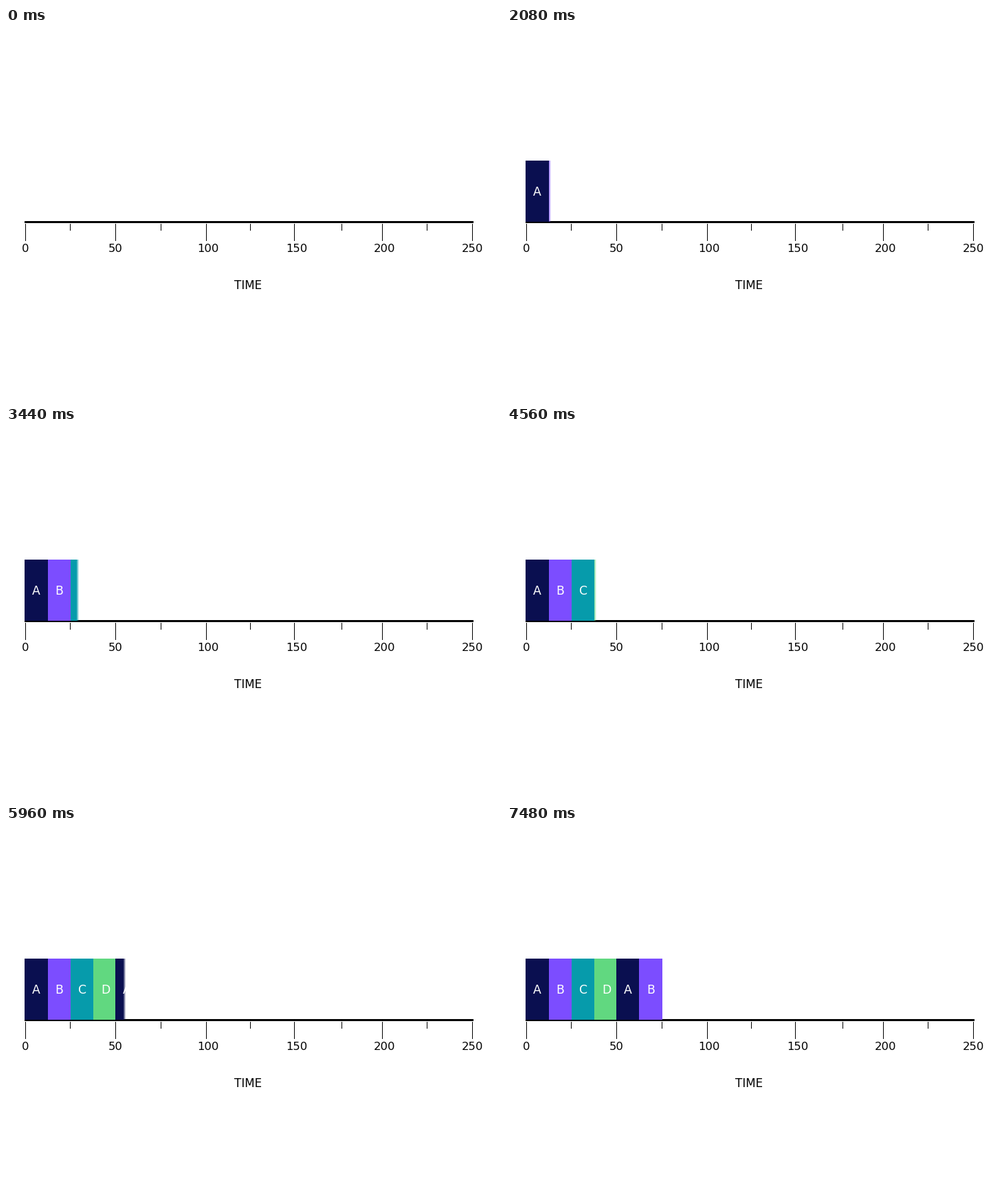
A matplotlib script for the animation above (8 s loop, 720 px wide and 540 px high).

```python
import numpy as np
import matplotlib.pyplot as plt
from matplotlib.animation import FuncAnimation
from matplotlib.colors import to_rgb
from matplotlib.patches import Rectangle

WIDTH, HEIGHT = 720, 540
FRAMES, INTERVAL = 200, 40
SOFT = 4          # width of the blurred wipe edge, px
WIPE_STEPS = 12
TOP, BOTTOM = 193, 282

NAVY, VIOLET, TEAL, GREEN = "#0a0f50", "#7c4dff", "#069bab", "#61d880"

# letter, colour, left, right, letter centre, first and last frame of the wipe
BLOCKS = [
    ("A", NAVY, 27, 61, 43.8, 20, 31),
    ("B", VIOLET, 61, 94, 77.5, 52, 62),
    ("C", TEAL, 94, 127, 110.5, 83, 93),
    ("D", GREEN, 127, 161, 144.5, 114, 125),
    ("A", NAVY, 159, 192, 175.5, 145, 156),
    ("B", VIOLET, 192, 226, 209.3, 176, 187),
]
LABELS = [(0, 28), (50, 158.7), (100, 294.2), (150, 422.5), (200, 550.5), (250, 678.5)]
LONG_TICKS = [28, 159, 291, 419, 547, 678]
SHORT_TICKS = [93, 225, 355, 488, 612]

plt.rcParams["font.family"] = "DejaVu Sans"
fig = plt.figure(figsize=(WIDTH / 72, HEIGHT / 72), dpi=72, facecolor="white")
ax = fig.add_axes([0, 0, 1, 1])
ax.axis("off")


def box(x, y, w, h):
    ax.add_patch(Rectangle((x, y), w, h, facecolor="black", linewidth=0, zorder=1))


def label(x, baseline, text, size, color="black"):
    return ax.text(x, baseline, text, fontsize=size, color=color,
                   ha="center", va="baseline", zorder=5)


class Block:
    """A coloured slot revealed from left to right behind a soft edge."""

    def __init__(self, letter, color, left, right, center, start, end):
        self.width, self.start, self.end = right - left, start, end
        self.pixels = np.ones((1, self.width, 4))
        self.pixels[..., :3] = to_rgb(color)
        self.image = ax.imshow(self.pixels, extent=(left, right, BOTTOM, TOP),
                               aspect="auto", interpolation="nearest", zorder=3)
        self.text = label(center, 244, letter, 17.3, "white")

    def update(self, frame):
        shown = frame >= self.start
        self.image.set_visible(shown)
        self.text.set_visible(shown)
        if not shown:
            return
        progress = 1 if frame >= self.end else (frame - self.start + 1) / WIPE_STEPS
        edge = progress * (self.width + SOFT)
        columns = np.arange(self.width) + 0.5
        self.pixels[0, :, 3] = np.clip((edge - columns) / SOFT, 0, 1)
        self.image.set_data(self.pixels)


box(27, 281, 653, 3)
for x in LONG_TICKS:
    box(x, 285, 1, 25)
for x in SHORT_TICKS:
    box(x, 285, 1, 10)
for value, x in LABELS:
    label(x, 326, str(value), 16.4)
label(352.5, 380, "TIME", 16.8)

blocks = [Block(*spec) for spec in BLOCKS]
ax.set_xlim(0, WIDTH)
ax.set_ylim(HEIGHT, 0)


def update(frame):
    for block in blocks:
        block.update(frame)
    return []


anim = FuncAnimation(fig, update, frames=FRAMES, interval=INTERVAL,
                     repeat=True, repeat_delay=0, blit=False)
plt.show()
```
